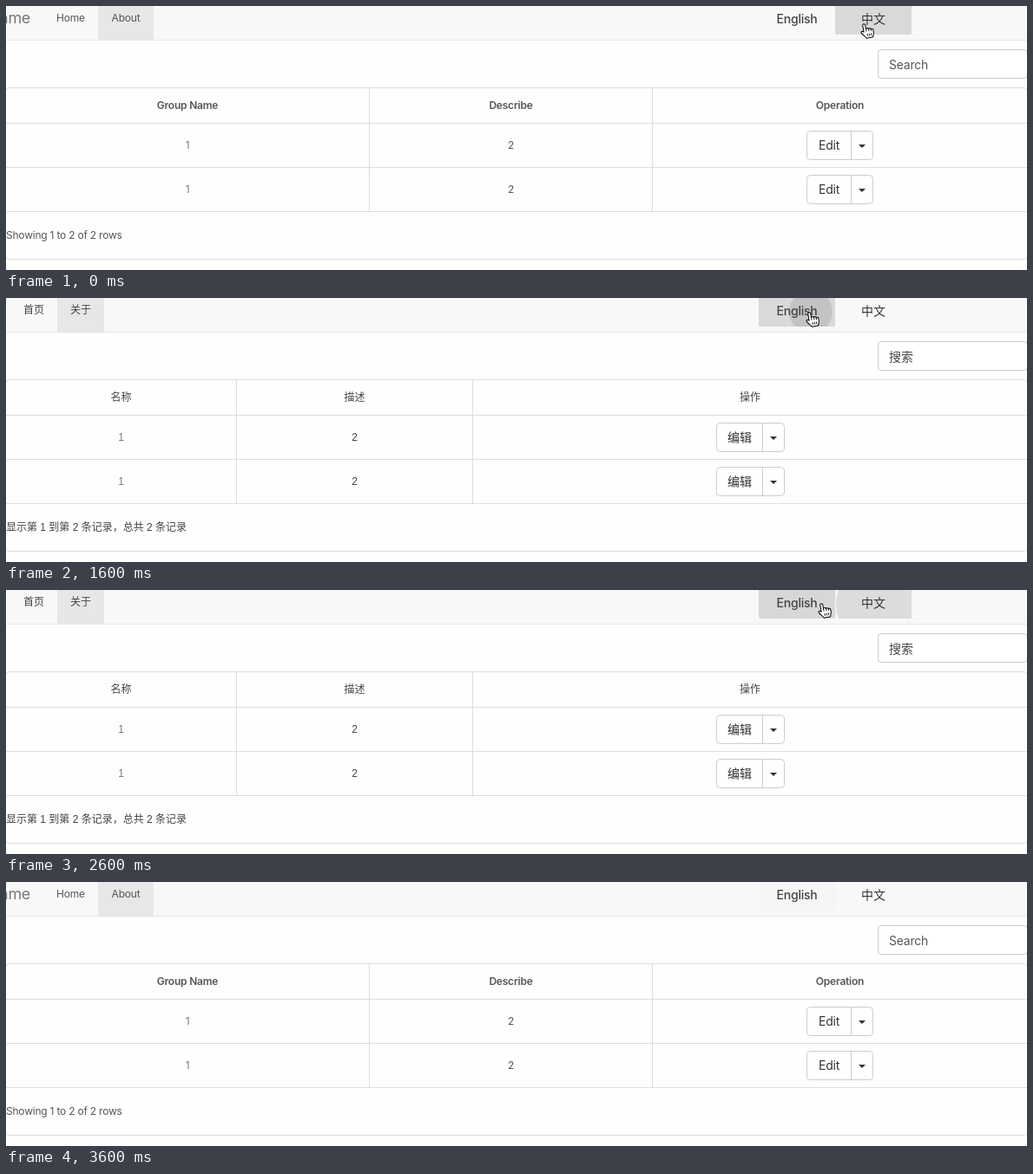
Animation of 1176x305 px, one loop 3.8 s. Source, as an HTML page:

```html
<!DOCTYPE html>
<html lang="en">
<head>
<meta charset="utf-8">
<title>Language switch</title>
<style>
html, body { margin: 0; width: 100%; height: 100%; overflow: hidden; background: #fefefd; }
svg { display: block; width: 100vw; height: 100vh; }
text { font-family: Inter, "Noto Sans CJK SC", "Noto Sans CJK", sans-serif; letter-spacing: -.018em; fill: #555; }
.zh text { font-family: "Liberation Sans", "Noto Sans CJK SC", "Noto Sans CJK", sans-serif; letter-spacing: 0; fill: #444; }
.line { fill: none; stroke: #ddd; }
.field { fill: #fff; stroke: #ccc; }
</style>
</head>
<body>
<svg id="stage" viewBox="0 0 1176 305"></svg>
<script>
const stage = document.getElementById('stage');

const rect = (x, y, w, h, attrs = '') =>
  `<rect x="${x}" y="${y}" width="${w}" height="${h}" ${attrs}/>`;
const text = (s, x, y, size = 12, attrs = '') =>
  `<text x="${x}" y="${y}" font-size="${size}" ${attrs}>${s}</text>`;
const mid = (s, x, y, size, attrs = '') =>
  text(s, x, y, size, `text-anchor="middle" ${attrs}`);

const PAGES = {
  en: {
    brand: 'Name', nav: [['Home', 74.5], ['About', 138]], tab: [106, 64],
    search: 'Search', cols: [418.5, 744.5], centers: [209, 581.5, 960.5],
    heads: ['Group Name', 'Describe', 'Operation'], weight: 600,
    edit: 'Edit', button: [922.5, 973.5, 998.5],
    footer: 'Showing 1 to 2 of 2 rows'
  },
  zh: {
    brand: '', nav: [['首页', 32], ['关于', 86]], tab: [59, 54],
    search: '搜索', cols: [265.5, 537.5], centers: [132.5, 401.5, 857],
    heads: ['名称', '描述', '操作'], weight: 400,
    edit: '编辑', button: [818.5, 871.5, 896.5],
    footer: '显示第 1 到第 2 条记录，总共 2 条记录'
  }
};

function tableRow(p, y) {
  const [left, split, right] = p.button;
  const caret = (split + right) / 2;
  return mid('1', p.centers[0], y + 4, 12, 'style="fill:#777"') +
    mid('2', p.centers[1], y + 4, 12) +
    rect(left, y - 16.5, right - left, 33, 'rx="4" class="field"') +
    `<path d="M${split} ${y - 16.5}v33" stroke="#ccc"/>` +
    mid(p.edit, (left + split) / 2, y + 5, 14, 'style="fill:#333"') +
    `<path d="M${caret - 4} ${y - 1}h8l-4 4z" fill="#333"/>`;
}

function page(lang) {
  const p = PAGES[lang];
  return `<g id="${lang}" class="${lang}" lang="${lang}">` +
    rect(p.tab[0], 0, p.tab[1], 39, 'fill="#e7e7e7"') +
    text(p.brand, 28, 20, 18, 'text-anchor="end" style="fill:#777"') +
    p.nav.map(([s, x]) => mid(s, x, 18, 12)).join('') +
    text(p.search, 1017, 73, 14) +
    p.cols.map(x => `<path class="line" d="M${x} 95V237"/>`).join('') +
    p.heads.map((s, i) => mid(s, p.centers[i], 119, 12, `font-weight="${p.weight}"`)).join('') +
    tableRow(p, 161) + tableRow(p, 212) +
    text(p.footer, 0, 269) + '</g>';
}

const BUTTONS = { enBtn: 867, zhBtn: 955 };
const button = ([id, x]) =>
  `<clipPath id="${id}Clip">${rect(x, 0, 88, 33)}</clipPath>` +
  `<g clip-path="url(#${id}Clip)">` +
  rect(x, -4, 88, 37, `rx="2" id="${id}"`) +
  `<circle id="${id}Ripple" fill="#000" fill-opacity=".1"/></g>`;

stage.innerHTML =
  rect(0, 0, 1176, 305, 'fill="#fefefd"') +
  rect(0, 0, 1176, 39, 'fill="#f8f8f8"') +
  rect(0, 39, 1176, 1, 'fill="#e7e7e7"') +
  rect(1004.5, 50.5, 172, 33, 'rx="4" class="field"') +
  rect(-.5, 94.5, 1177, 198, 'rx="4" class="line"') +
  '<path class="line" d="M0 135.5H1176M0 186.5H1176M0 237.5H1176"/>' +
  page('en') + page('zh') +
  Object.entries(BUTTONS).map(button).join('') +
  mid('English', 911, 20, 14, 'font-weight="500" style="fill:#444"') +
  mid('中文', 999, 20, 14, 'lang="zh" style="fill:#333;letter-spacing:0"') +
  `<g id="hand"><g transform="rotate(-10)" stroke="#000" stroke-linejoin="round">
    <path fill="#fff" d="M-1.5 9V1.2a1.5 1.5 0 0 1 3 0V6C2 4.8 4.2 4.8 4.5 6.6C5 5.4 6.9 5.7 7.1 7.2C8 6.4 9.5 6.8 9.5 8.4V11C9.5 13 8.3 14 8 16.5H.4C-.2 14.5-3 12.2-4.4 9.8C-5.2 8-3.2 7-1.5 9Z"/>
    <path fill="none" stroke-width=".8" d="M1.5 6V9M4.5 6.6V9.2M7.1 7.2V9.4M2 11.5v3M4.2 11.5v3M6.4 11.5v3"/>
  </g></g>
  <path id="arrow" d="M0 0V13.2L3 10.4L5 15L7.2 14L5.2 9.6H9.4Z" stroke="#fff" stroke-width="1.2" paint-order="stroke"/>`;

const el = id => document.getElementById(id);
const HOVER = '#d9d9da', NONE = 'none';

// Each step keeps what the previous ones set; a ripple is [x, y, radius].
const STEPS = [
  { at: 0, lang: 'en', enBtn: NONE, zhBtn: HOVER, cursor: 'hand', pos: [988, 21] },
  { at: 200, pos: [975, 22] },
  { at: 800, lang: 'zh', zhRipple: [976, 22, 20] },
  { at: 1000, zhRipple: [976, 22, 65] },
  { at: 1200, zhRipple: [976, 22, 100] },
  { at: 1400, zhBtn: NONE, zhRipple: null, enBtn: HOVER, pos: [925, 17] },
  { at: 1600, enRipple: [927, 16, 25] },
  { at: 1800, lang: 'en', enRipple: [927, 16, 80] },
  { at: 2000, enBtn: '#dedede', enRipple: null, zhBtn: HOVER, pos: [1000, 14] },
  { at: 2200, enBtn: NONE },
  { at: 2400, zhRipple: [1003, 16, 25] },
  { at: 2600, lang: 'zh', zhBtn: '#f5f5f5', zhRipple: [1003, 16, 47], enBtn: '#d7d7d7', pos: [939, 16] },
  { at: 2800, enRipple: [939, 16, 12] },
  { at: 3000, zhBtn: NONE, zhRipple: null, enRipple: [939, 16, 50] },
  { at: 3200, lang: 'en', enRipple: [939, 16, 90], cursor: 'arrow', pos: [885.5, 64.5] },
  { at: 3400, enBtn: '#e3e3e3', enRipple: null, cursor: '' },
  { at: 3600, enBtn: '#f5f5f5' }
];
const LOOP = 3800;

const show = (id, on) => el(id).setAttribute('visibility', on ? 'visible' : 'hidden');

function ripple(id, shape) {
  const [x, y, r] = shape || [0, 0, 0];
  Object.entries({ cx: x, cy: y, r }).forEach(([k, v]) => el(id).setAttribute(k, v));
}

function draw(t) {
  const s = Object.assign({}, ...STEPS.filter(step => step.at <= t));
  for (const lang in PAGES) {
    show(lang, s.lang === lang);
    el(lang + 'Btn').setAttribute('fill', s[lang + 'Btn']);
    ripple(lang + 'BtnRipple', s[lang + 'Ripple']);
  }
  for (const id of ['hand', 'arrow']) {
    show(id, s.cursor === id);
    el(id).setAttribute('transform', `translate(${s.pos})`);
  }
}

const start = performance.now();
function tick() {
  draw((performance.now() - start) % LOOP);
  requestAnimationFrame(tick);
}
tick();
</script>
</body>
</html>
```
